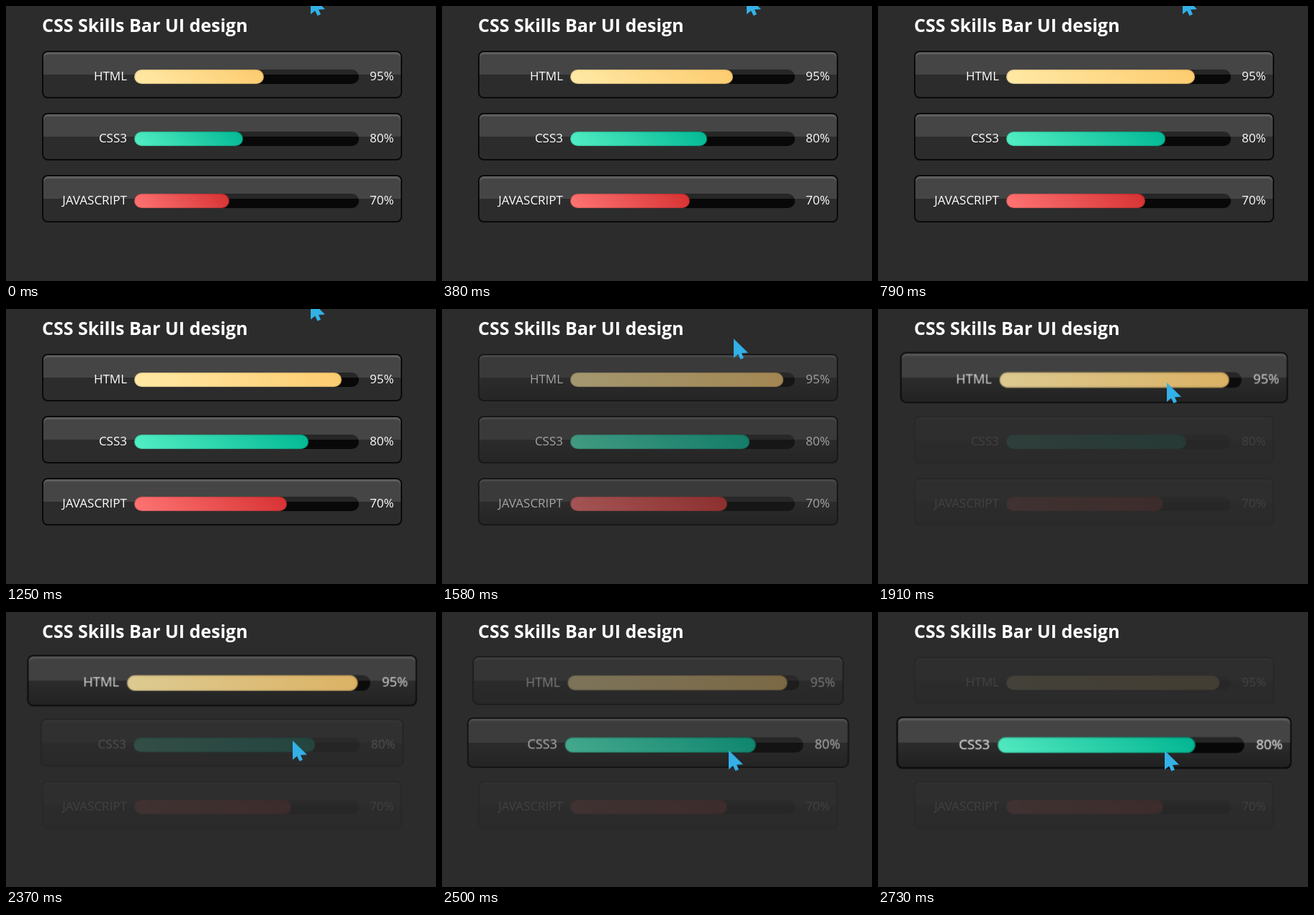
Write an HTML page that moves like this. It is 597 by 381 pixels and loops after 2780 ms.

```html
<!DOCTYPE html>
<html lang="en">
<head>
<meta charset="utf-8">
<title>CSS Skills Bar UI design</title>
<style>
  html, body { margin: 0; width: 100%; height: 100%; overflow: hidden; background: #2c2c2c; }
  body { position: relative; color: #fff; font: 17px/23px "Open Sans", "Noto Sans", sans-serif; }
  h1 { position: absolute; left: 50px; top: 9px; margin: 0; font-size: 25px; line-height: 34px; font-weight: 700; white-space: nowrap; }
  .skill {
    position: absolute; left: 50px; box-sizing: border-box; width: 500px; height: 66px;
    padding-top: 6px; display: flex; align-items: center;
    border: 2px solid #0a0a0a; border-radius: 8px;
  }
  .skill::before {
    content: ""; position: absolute; left: 0; right: 0; top: 0; height: 31px;
    border-radius: 6px 6px 0 0; background: rgba(255, 255, 255, .123);
    box-shadow: inset 0 3px 1px rgba(255, 255, 255, .14);
  }
  .shade {
    position: absolute; left: 0; right: 0; bottom: 0; height: 31px;
    border-radius: 0 0 6px 6px; background: linear-gradient(#0000, #0004);
  }
  .name, .value { position: relative; top: -1.5px; white-space: nowrap; }
  .name { width: 116px; text-align: right; }
  .track { width: 312px; height: 20px; margin: 0 15px 0 10px; border-radius: 10px; background: #080808; }
  .fill { position: relative; height: 100%; border-radius: 10px; box-shadow: inset 0 0 2px rgba(0, 0, 0, .6); }
  #cursor { position: absolute; left: 0; top: 0; overflow: visible; }
</style>
</head>
<body>
<h1>CSS Skills Bar UI design</h1>
<svg id="cursor" width="20" height="28"><path d="M0 0V26.5L6 21.5L9.5 28.5L14 26.5L11 20L20 19.5Z" fill="#33b1e7"/></svg>
<script>
const LOOP = 2780, FADE = 500, DIM = .1;
const ENTER = 1440;

// on / off: when the pointer enters and leaves the card
const skills = [
  { name: 'HTML', value: 95, colors: '#ffeaa7, #fdcb6e', on: 1675, off: 2300 },
  { name: 'CSS3', value: 80, colors: '#55efc4, #00b894', on: 2325 },
  { name: 'JAVASCRIPT', value: 70, colors: '#ff7675, #d63031' }
];

// time, x, y of the pointer tip
const path = [
  [0, 423, -15], [1050, 423, -15], [1250, 423, -12], [1440, 419, 2],
  [1530, 408, 26], [1580, 405, 41], [1680, 402, 64], [1910, 401, 102],
  [2260, 399, 124], [2320, 398, 146], [2370, 398, 178], [2430, 398, 190],
  [2520, 398, 192], [LOOP, 398, 192]
];

const bez = (a, b, u) => 3 * a * u * (1 - u) ** 2 + 3 * b * u * u * (1 - u) + u ** 3;

// the CSS "ease" curve
function ease(x) {
  if (x <= 0) return 0;
  if (x >= 1) return 1;
  let lo = 0, hi = 1;
  for (let i = 0; i < 24; i++) {
    const mid = (lo + hi) / 2;
    if (bez(.25, .25, mid) < x) lo = mid; else hi = mid;
  }
  return bez(.1, 1, lo);
}

// value after a chain of [time, goal] transitions that may interrupt each other
function follow(t, start, moves) {
  let v = start;
  moves.forEach(([at, goal], i) => {
    if (t < at) return;
    const end = i + 1 < moves.length ? Math.min(t, moves[i + 1][0]) : t;
    v += (goal - v) * ease((end - at) / FADE);
  });
  return v;
}

const progress = t => 1 - Math.max(0, .628 - .365 * t / 1000) ** 2;

function play(el, frames) {
  el.animate(frames, { duration: LOOP, iterations: Infinity });
}

function sample(el, pose) {
  const n = 139;
  play(el, Array.from({ length: n + 1 }, (_, i) => pose(i / n * LOOP)));
}

const cursor = document.getElementById('cursor');

skills.forEach((s, i) => {
  const card = document.createElement('div');
  card.className = 'skill';
  card.style.top = 62 + i * 86 + 'px';
  card.innerHTML = `<div class="shade"></div><div class="name">${s.name}</div>
    <div class="track"><div class="fill" style="background:linear-gradient(45deg, ${s.colors})"></div></div>
    <div class="value">${s.value}%</div>`;
  cursor.before(card);

  const fade = [[ENTER, DIM]], grow = [];
  if (s.on) { fade.push([s.on, 1]); grow.push([s.on, 1.1]); }
  if (s.off) { fade.push([s.off, DIM]); grow.push([s.off, 1]); }

  sample(card, t => ({
    opacity: follow(t, 1, fade),
    transform: `scale(${follow(t, 1, grow)})`
  }));
  sample(card.querySelector('.fill'), t => ({ width: s.value * progress(t) + '%' }));
  sample(card.querySelector('.shade'), t => ({ opacity: t < ENTER ? 0 : 1 }));
});

play(cursor, path.map(([t, x, y]) => ({ offset: t / LOOP, transform: `translate(${x}px, ${y}px)` })));
</script>
</body>
</html>
```
